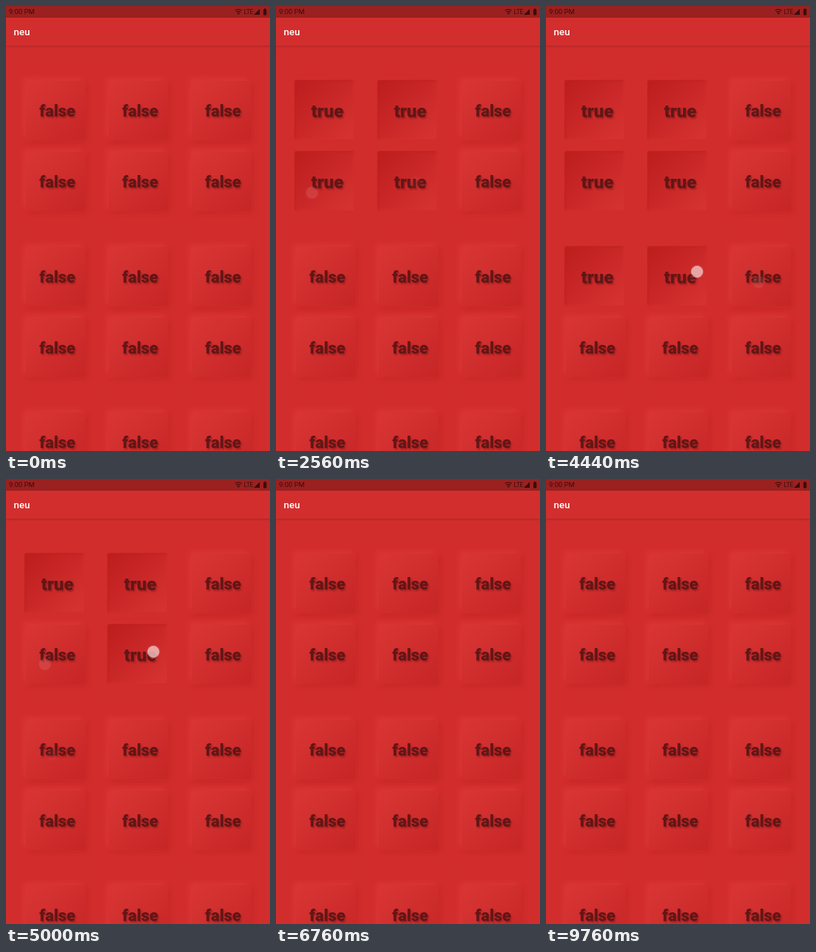
Animation of 360 by 608 pixels, one loop 9800 ms. Source, as an HTML page:

```html
<!DOCTYPE html>
<html lang="en">
<head>
<meta charset="utf-8">
<title>neu</title>
<style>
  html, body { margin: 0; width: 100%; height: 100%; overflow: hidden; background: #d22d2d; }
  body { position: relative; font-family: Roboto, sans-serif; }
  div, svg { position: absolute; }
  #status { left: 0; top: 0; width: 360px; height: 16px; background: #9b2120; color: #3d0c0c; font-size: 9.5px; line-height: 16px; }
  #status span { position: absolute; left: 4px; white-space: nowrap; }
  #bar { left: 0; top: 16px; width: 360px; height: 38px; background: #d32e2e; box-shadow: 0 1px 3px #8a1c1c88;
         color: #fff; font-size: 13.4px; font-weight: 500; line-height: 39px; text-indent: 10.5px; }
  .face { border-radius: 4px; }
  .raised { width: 81px; height: 81px; background: linear-gradient(135deg, #d93535, #c72626);
            box-shadow: -4px -4px 7px #d93636, 4px 4px 7px #c82929; }
  .sunk { width: 82px; height: 82px; background: linear-gradient(135deg, #bd1d1d, #d73333);
          box-shadow: inset 1px 1px 3px #bd2323, inset -1px -1px 3px #d63434, 0 0 2px #cc2a2a; }
  .label { width: 90px; height: 30px; line-height: 30px; text-align: center; font-weight: 900;
           color: #611616; text-shadow: 1.5px 1.5px 2px #84191999; }
  .touch { width: 14px; height: 14px; margin: -7.5px; border: .5px solid #f3c9c9; border-radius: 50%;
           background: #f0c4c4; box-shadow: 0 0 2px #e59a9a; opacity: 0; }
</style>
</head>
<body>
<div id="status">
  <span>9:00 PM</span>
  <svg width="360" height="16" fill="#3d0c0c">
    <path d="M312.5 6.2Q317 2.8 321.5 6.2M314.3 8.4Q317 6.4 319.7 8.4" fill="none" stroke="#3d0c0c" stroke-width="1.2"/>
    <path d="M315.3 9.8Q317 8.8 318.7 9.8L317 12ZM338 12L346 4V12ZM351 4.5H352V3.5H354V4.5H355.3V12.5H351Z"/>
    <text x="324.3" y="11.2" font-size="8.3">LTE</text>
  </svg>
</div>
<div id="bar">neu</div>
<script>
const LOOP = 9800, FADE = 80, HOLD = 90, GHOST = 400;
const TILES = 15;

// Tiles are switched on along a snaking route, then off again in reverse.
const bursts = [
  { start: 640, gap: 600, route: [0, 1] },
  { start: 2240, gap: 200, route: [4, 3] },
  { start: 3360, gap: 180, route: [6, 7, 8] }
];
bursts.push({ start: 4260, gap: 200, route: bursts.flatMap(b => b.route).reverse() });

const taps = bursts.flatMap(({ start, gap, route }) =>
  route.map((tile, i) => ({ tile, time: start + gap * i })));

const clamp = v => Math.max(0, Math.min(1, v));

// Three columns; rows stand in pairs.
function center(i) {
  const row = Math.floor(i / 3);
  return { x: 70 + 113 * (i % 3), y: 144 + 97 * (row % 2) + 226.5 * Math.floor(row / 2) };
}

function add(className, x, y) {
  const el = document.createElement('div');
  el.className = className;
  el.style.left = x + 'px';
  el.style.top = y + 'px';
  document.body.append(el);
  return el;
}

const tiles = Array.from({ length: TILES }, (_, i) => {
  const { x, y } = center(i);
  return {
    raised: add('face raised', x - 43.5, y - 42),
    sunk: add('face sunk', x - 45, y - 43),
    label: add('label', x - 45, y - 15)
  };
});

// The finger lands a little off centre, along a slanted line.
const touches = taps.map(({ tile }, i) => {
  const { x, y } = center(tile), drift = 22 * Math.cos(1.88 * (i - 8));
  return add('touch', x + drift, y + 3 - drift / 2);
});

function pressed(tile, t) {
  return taps.filter(tap => tap.tile === tile)
    .reduce((sum, { time }, i) => sum + (i % 2 ? -1 : 1) * clamp((t - time) / FADE), 0);
}

function touchOpacity(age) {
  if (age < -HOLD || age > GHOST) return 0;
  return age < 0 ? 0.8 : Math.max(0.8 * (1 - age / FADE), 0.2 * (1 - age / GHOST));
}

function draw(now) {
  const t = now % LOOP;
  tiles.forEach(({ raised, sunk, label }, i) => {
    const p = pressed(i, t), on = p > 0.5;
    raised.style.opacity = 1 - p;
    sunk.style.opacity = p;
    label.textContent = on;
    label.style.fontSize = on ? '24px' : '22px';
  });
  touches.forEach((el, i) => el.style.opacity = touchOpacity(t - taps[i].time));
  requestAnimationFrame(draw);
}
requestAnimationFrame(draw);
</script>
</body>
</html>
```
